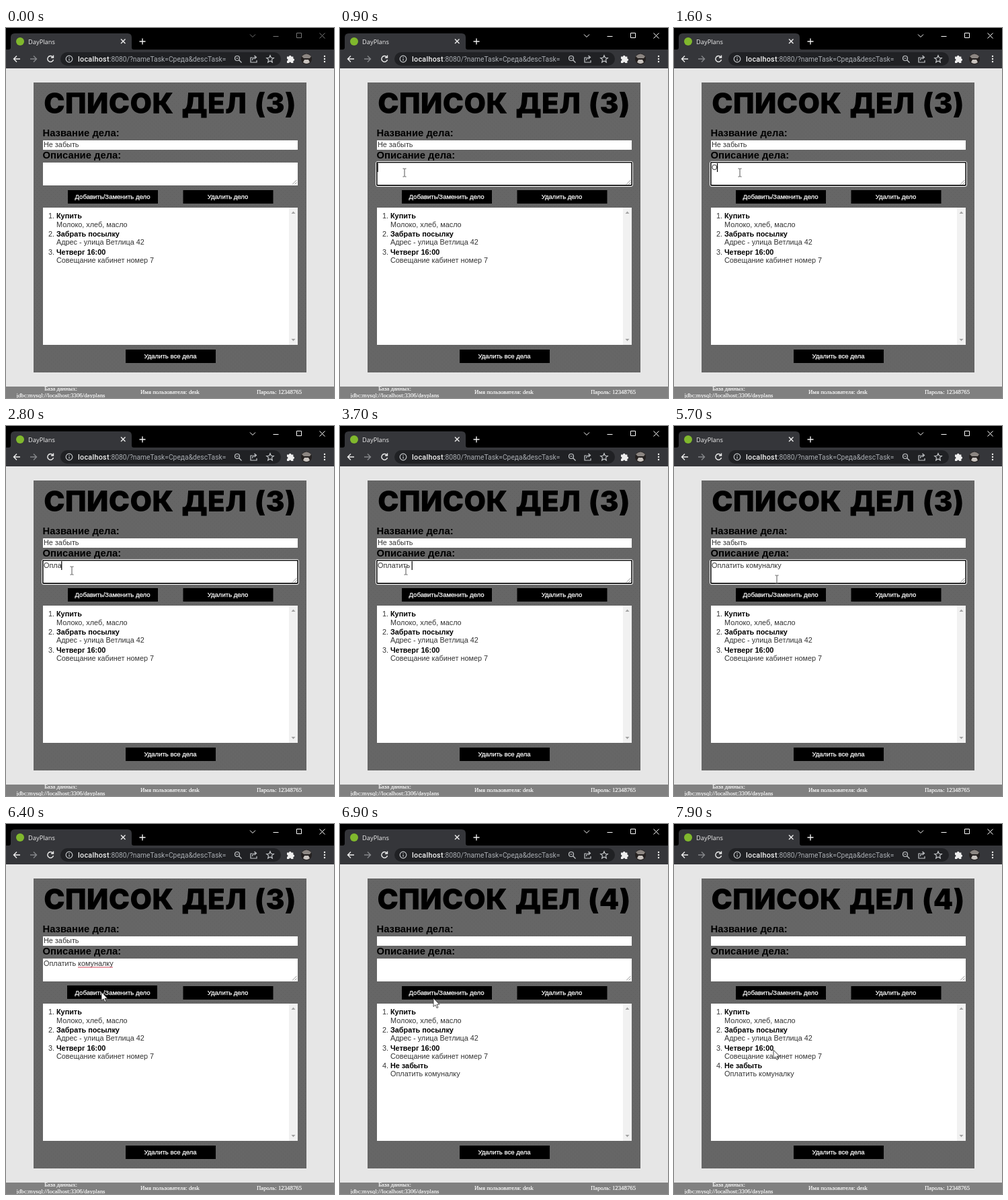
An HTML page that plays this animation: 488 by 550 pixels, repeating every 8000 ms.

```html
<!DOCTYPE html>
<html lang="ru">
<head>
<meta charset="utf-8">
<style>
html, body { margin: 0; width: 100%; height: 100%; overflow: hidden; background: #e6e6e6; }
svg { display: block; width: 488px; height: 550px; }
text { white-space: pre; font: 10.85px "Liberation Sans", Arial, sans-serif; }
.plain { fill: #333; }
.bold { font-weight: bold; }
.label { font-size: 14.8px; font-weight: bold; }
.title { font: 900 42px Inter, "Open Sans", sans-serif; letter-spacing: .45px; word-spacing: 2.7px; text-anchor: middle; }
.tab { font: 9.3px "Open Sans", sans-serif; fill: #eee; }
.url { font: 10.3px Roboto, sans-serif; fill: #a9adb2; }
.host { font-weight: 500; font-size: 10.8px; letter-spacing: .25px; fill: #f4f4f4; }
.button { font-size: 9.55px; fill: #fff; stroke: #fff; stroke-width: .25; text-anchor: middle; }
.foot { font: 8.8px "Liberation Serif", Times, serif; fill: #fff; stroke: #fff; stroke-width: .15; text-anchor: middle; }
.line { fill: none; stroke-width: 1.4; }
</style>
</head>
<body>
<svg viewBox="0 0 488 550">
  <defs>
    <pattern id="dots" width="6" height="6" patternUnits="userSpaceOnUse">
      <path fill="#666" d="M0 0h6v6H0z"/>
      <path fill="#606060" d="M1 1h1v1H1zM4 4h1v1H4z"/>
    </pattern>
  </defs>

  <!-- Browser window -->
  <path d="M0 0h488v33H0z"/>
  <path fill="#35363a" d="M0 32h4q3 0 3-3V14q0-6 6-6h168q6 0 6 6v15q0 3 3 3h298v28H0z"/>
  <circle cx="21" cy="20" r="6" fill="#80b82d"/>
  <text class="tab" x="33" y="23.500">DayPlans</text>
  <path class="line" stroke="#eee" d="M171 16.500l6.500 6.500m0-6.500l-6.500 6.500M198.500 20h9m-4.500-4.500v9"/>
  <g id="controls" class="line" style="stroke-width:1">
    <path d="M363 9.500l4 4 4-4M397.500 12.500h8M432.500 7.500h7v7h-7zM466.500 7.500l8 8m0-8l-8 8"/>
  </g>
  <g class="line" stroke="#eee">
    <path d="M21 46H11.500m4.500-4.500L11.500 46l4.500 4.500"/>
    <path stroke="#85878a" d="M36 46h9.500m-4.500-4.500l4.500 4.500-4.500 4.500"/>
    <path d="M69.500 43a4.400 4.400 0 1 0 1 4M70.500 40.500v3.500H67"/>
  </g>
  <rect x="81" y="36" width="328" height="20" rx="10" fill="#202124"/>
  <g class="line" stroke="#c4c7ca" style="stroke-width:1.2">
    <circle cx="94" cy="46" r="4.800"/>
    <path d="M94 45.500v3.200M94 43v1.200"/>
    <circle cx="344" cy="45" r="3.500"/>
    <path d="M346.500 47.500l4 4M342.500 45h3M367 44h-3v7h9v-3M366.500 48q.5-4.500 5-4.500m-2-2.500l3 2.500-3 2.500"/>
    <path d="M393 40.800l1.500 3.500 3.800.3-2.900 2.500.9 3.800-3.300-2-3.300 2 .9-3.800-2.900-2.500 3.800-.3z"/>
  </g>
  <text class="url" x="154" y="50">:8080/?nameTask=Среда&amp;descTask=</text>
  <text class="url host" x="107" y="50">localhost</text>
  <path fill="#eee" d="M418 42.500h3a1.700 1.700 0 0 1 3.400 0h3v3a1.700 1.700 0 0 1 0 3.400v3h-3.200a1.500 1.500 0 0 0-3 0H418v-3.200a1.500 1.500 0 0 0 0-3z"/>
  <circle cx="447" cy="46" r="8" fill="#24201f"/>
  <path fill="#8c8682" d="M440 42q7-7 14 0l-2 3h-9z"/>
  <path fill="#c9c4c0" d="M444 47h6l2 4q-5 4-10 0z"/>
  <g fill="#eee"><circle cx="474" cy="42" r="1.200"/><circle cx="474" cy="46" r="1.200"/><circle cx="474" cy="50" r="1.200"/></g>

  <!-- Page -->
  <path fill="#e6e6e6" d="M0 60h488v473H0z"/>
  <path fill="url(#dots)" d="M41 81h406v431H41z"/>
  <text id="title" class="title" x="244" y="127"></text>
  <text class="label" x="54.500" y="161">Название дела:</text>
  <path fill="#fff" d="M55 167h379v14H55z"/>
  <text id="name" class="plain" x="56" y="176.500"></text>
  <text class="label" x="54.500" y="194">Описание дела:</text>
  <path fill="#fff" d="M55 200h379v34H55z"/>
  <g id="focus" fill="none">
    <rect x="53.500" y="198.500" width="382" height="37" rx="2.500" stroke="#fff"/>
    <rect x="54.800" y="199.800" width="379.400" height="34" rx="1.500" stroke="#101010" stroke-width="1.600"/>
  </g>
  <path stroke="#777" stroke-width=".8" d="M426 232.500l6.500-6.500M429.500 232.500l3-3"/>
  <text id="desc" class="plain" x="56" y="210.500"></text>
  <path id="typo" class="line" stroke="#d8485c" style="stroke-width:1.200" d="M107 213h52"/>
  <path id="caret" d="M0 201h1.200v13H0z"/>
  <g id="buttons"></g>
  <path fill="#fff" d="M55 267h379v204H55z"/>
  <path fill="#f1f1f1" d="M421 267h13v204h-13z"/>
  <path fill="#a3a3a3" d="M424.500 276h6l-3-3.500zM424.500 462h6l-3 3.500z"/>
  <g id="list"></g>
  <path fill="#808080" d="M0 533h488v17H0z"/>
  <text class="foot" x="81.500" y="539">База данных:</text>
  <text class="foot" x="81.500" y="549">jdbc:mysql://localhost:3306/dayplans</text>
  <text class="foot" x="244" y="544">Имя пользователя: desk</text>
  <text class="foot" x="406.500" y="544">Пароль: 12348765</text>

  <!-- Pointers -->
  <path id="beam" class="line" stroke="#555" style="stroke-width:1" d="M-2.500-6h2l.5.500.5-.500h2M0-5.500v11M-2.500 6h2l.5-.500.5.500h2"/>
  <path id="arrow" fill="#fff" stroke="#222" stroke-width=".8" d="M0 0v12.500l3-2.600 2 4.600 2-.9-2-4.400h4z"/>
</svg>
<script>
const LOOP = 8000, STEP = 100;
const FOCUS = 900, CARET_OFF = 1400, BLUR = 6300, SAVED = 6600;
const taskName = 'Не забыть', taskDesc = 'Оплатить комуналку';
// Moment at which each letter of taskDesc is typed
const keyTimes = [1600, 2100, 2500, 2800, 2900, 3100, 3300, 3500, 3700,
  3800, 4000, 4200, 4300, 4600, 4700, 4900, 5000, 5100];
// Pointer path: time, x, y
const path = [[900, 96, 215], [1200, 98, 215], [5600, 98, 215], [5700, 153, 228],
  [6000, 152, 240], [6400, 142, 250], [6800, 142, 250], [7200, 129, 285],
  [7700, 150, 356], [7800, 150, 356], [7900, 148, 336]];
const tasks = [['Купить', 'Молоко, хлеб, масло'],
  ['Забрать посылку', 'Адрес - улица Ветлица 42'],
  ['Четверг 16:00', 'Совещание кабинет номер 7'],
  [taskName, taskDesc]];

const $ = id => document.getElementById(id);
const show = (id, on) => $(id).setAttribute('visibility', on ? 'visible' : 'hidden');
const move = (id, x, y) => $(id).setAttribute('transform', `translate(${x} ${y})`);

$('list').innerHTML = tasks.map(([head, body], i) => {
  const y = 283.4 + 26.6 * i;
  return `<g id="task${i}"><text class="plain" x="63" y="${y}">${i + 1}.</text>
    <text class="bold" x="75" y="${y}">${head}</text>
    <text class="plain" x="75" y="${y + 12.2}">${body}</text></g>`;
}).join('');

$('buttons').innerHTML = [['Добавить/Заменить дело', 92, 241],
  ['Удалить дело', 263.5, 241], ['Удалить все дела', 178, 478]].map(([label, x, y], i) =>
  `<rect id="key${i}" x="${x}" y="${y}" width="134" height="20"/>
   <text class="button" x="${x + 66.5}" y="${y + 13}">${label}</text>`).join('');

function pointer(t) {
  const i = path.findIndex(p => p[0] > t);
  if (i < 0) return path[path.length - 1].slice(1);
  const [t0, x0, y0] = path[i - 1], [t1, x1, y1] = path[i];
  const k = (t - t0) / (t1 - t0);
  return [x0 + (x1 - x0) * k, y0 + (y1 - y0) * k].map(Math.round);
}

function draw(t) {
  const saved = t >= SAVED, active = t >= FOCUS;
  const count = keyTimes.filter(k => k <= t).length;
  $('controls').setAttribute('stroke', active ? '#fff' : '#777');
  $('title').textContent = `СПИСОК ДЕЛ (${saved ? 4 : 3})`;
  $('name').textContent = saved ? '' : taskName;
  $('desc').textContent = saved ? '' : taskDesc.slice(0, count);
  show('task3', saved);
  show('focus', active && t < BLUR);
  show('typo', t >= BLUR && !saved);
  show('caret', active && t < CARET_OFF || count && t < 5700);
  move('caret', 55.5 + (count ? $('desc').getComputedTextLength() : 0), 0);
  const shift = t >= BLUR && !saved ? -1 : 0;
  move('key0', shift, shift);

  const [x, y] = active ? pointer(t) : [0, 0];
  const inText = y < 236;
  show('beam', active && inText);
  show('arrow', active && !inText);
  move(inText ? 'beam' : 'arrow', x, y);
}

const start = performance.now();
function frame() {
  const t = (performance.now() - start) % LOOP;
  draw(Math.floor(t / STEP) * STEP);
  requestAnimationFrame(frame);
}
frame();
</script>
</body>
</html>
```
